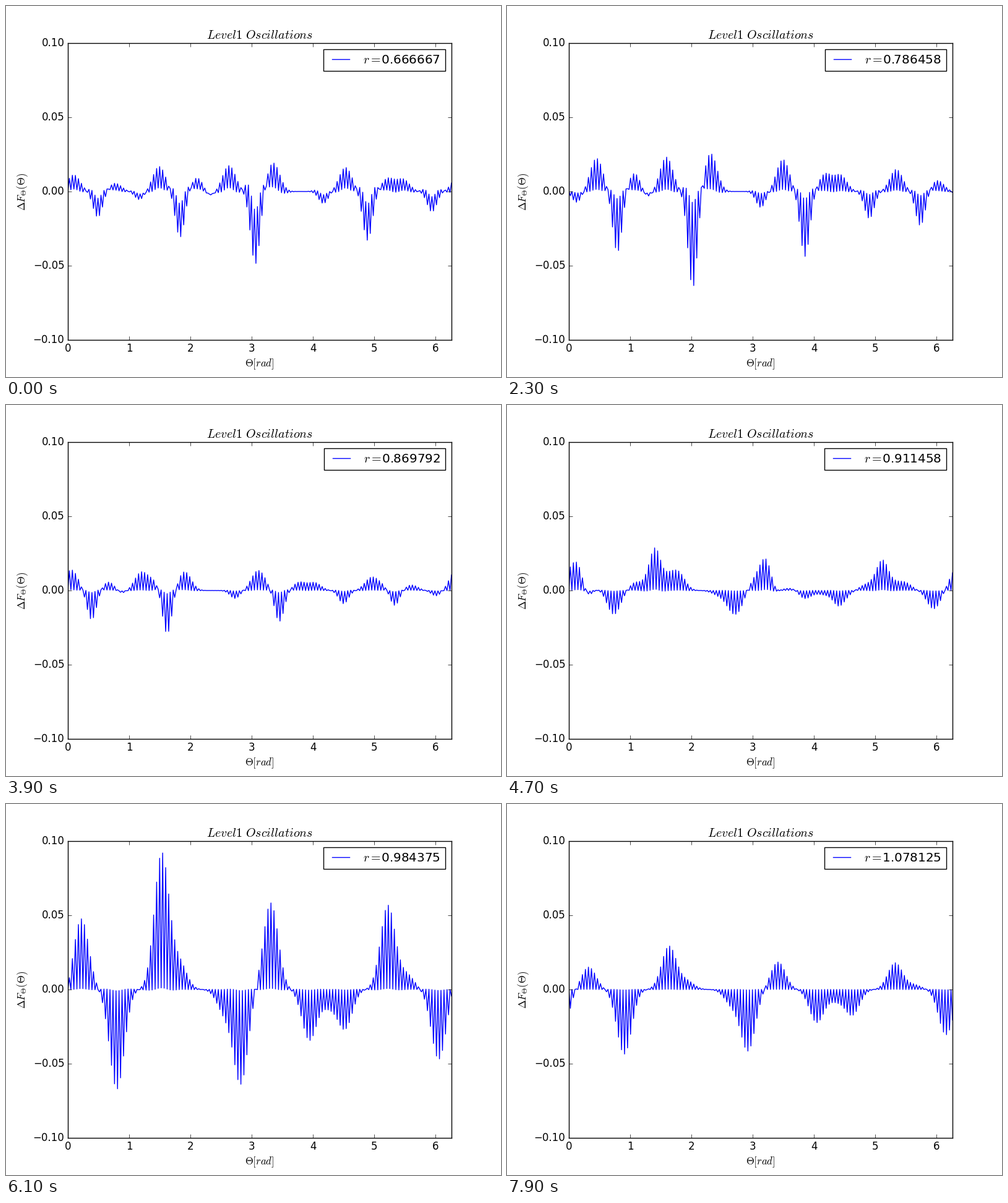
Recreate the animation shown at these times as a matplotlib script. Size 800 px wide and 600 px high, loop 8 s.

```python
import numpy as np
import matplotlib.pyplot as plt
from matplotlib.animation import FuncAnimation

plt.style.use("classic")
plt.rcParams.update({"figure.dpi": 100, "savefig.dpi": 100,
                     "figure.facecolor": "white", "savefig.facecolor": "white",
                     "font.sans-serif": ["DejaVu Sans"], "mathtext.fontset": "cm",
                     "xtick.major.pad": 3.3})

FRAMES, STEP, N = 80, 100, 256
theta = 2 * np.pi * np.arange(N) / N
odd = np.arange(N) % 2 == 1

# (angle, peak height in thousandths) of the two patterns
INNER = np.array([
    (.49, -28), (.77, 9), (1.17, -9), (1.49, 27), (1.83, -50), (2.11, 15),
    (2.31, -6), (2.63, 28), (3.06, -79), (3.35, 31), (4.17, -13), (4.53, 26),
    (4.89, -53), (5.22, 14), (5.47, 13), (5.94, -22), (6.38, 18)])
RING = np.array([
    (.22, 49), (.80, -77), (1.53, 94), (1.82, 18), (2.55, -17), (2.82, -72),
    (3.31, 60), (3.94, -39), (4.25, -12), (4.52, -30), (5.22, 58), (5.53, 10),
    (6.05, -54)])


def radius(frame):
    return 2 / 3 + frame / 192


def swell(frame, peak, rise, fall):
    """Cosine-squared growth to 1 at peak, then decay to 0."""
    d = frame - peak
    u = np.clip(d / np.where(d < 0, rise, fall), -1, 1)
    return np.cos(np.pi / 2 * u) ** 2


def zigzag(angle, height, width, leak):
    """Bumps on odd points; even points leak their negative curvature."""
    angle, height, width = (np.reshape(v, (-1, 1)) for v in (angle, height, width))
    d = (theta - angle + np.pi) % (2 * np.pi) - np.pi
    q = (d / width) ** 2
    bump = height * np.exp(-q / 2)
    return np.where(odd, bump, leak * bump * (1 - q) / width ** 2).sum(0)


def wave(frame):
    r = radius(frame)
    leak = .0016 * np.exp(-frame / 28)

    # inner pattern sweeps back and slows down towards r = 0.957
    angle, height = INNER.T
    turn = 18.8 * ((r - .957) ** 2 - (radius(0) - .957) ** 2)
    width = np.where(height > 0, .105, .08)
    inner = zigzag(angle + turn, height * swell(frame, 8, 19, 55), width, leak)

    # ring pattern drifts slowly, its dips lag behind its crests
    angle, height = RING.T
    gain = swell(frame, np.where(height > 0, 64, 68), 30, 24)
    ring = zigzag(angle + 1.1 * (r - .984), height * gain,
                  np.full(len(angle), .12), leak)
    return (inner + ring) / 1000


def label(frame):
    return r"$r=\hspace{-0.13}$%f" % radius(frame)


fig, ax = plt.subplots(figsize=(8, 6), dpi=100)
line, = ax.plot(theta, wave(0), "b-", lw=1, label=label(0))
ax.set_xlim(0, theta[-1])
ax.set_ylim(-.1, .1)
ax.set_xticks(range(7))
ax.set_yticks([-.1, -.05, 0, .05, .1])
ax.set_title(r"$Level1\ Oscillations$")
ax.set_xlabel(r"$\Theta [rad]$", labelpad=4.2)
ax.set_ylabel(r"$\Delta F_\Theta(\Theta)$", labelpad=4.2)
text = ax.legend(loc="upper right").get_texts()[0]


def draw(frame):
    line.set_ydata(wave(frame))
    text.set_text(label(frame))
    return line, text


anim = FuncAnimation(fig, draw, frames=FRAMES, interval=STEP,
                     repeat=True, repeat_delay=0, blit=False)
plt.show()
```
